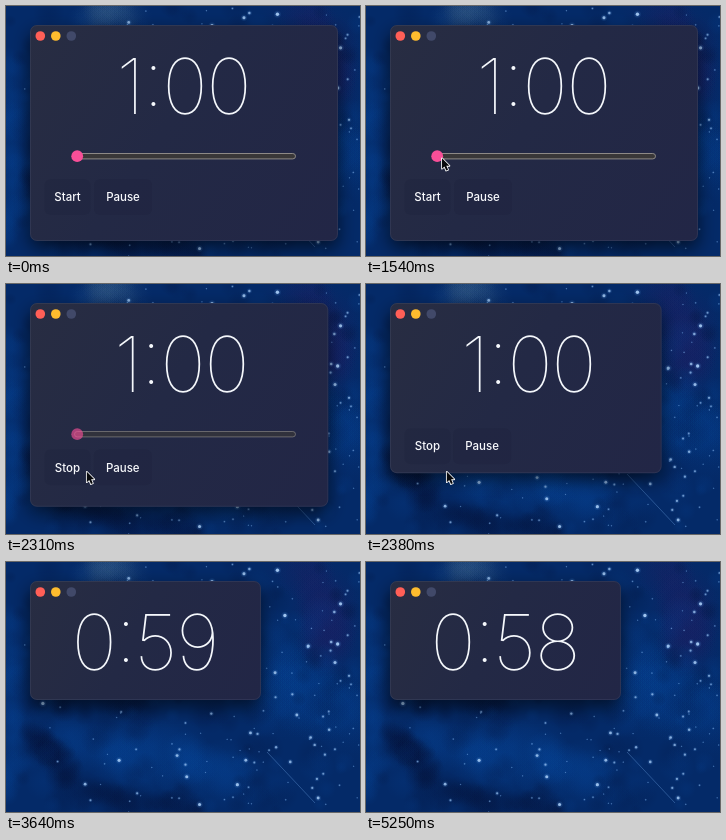
An HTML page with a canvas for the animation above (5320 ms loop, 354 by 250 pixels).

```html
<!DOCTYPE html>
<html lang="en">
<head>
<meta charset="utf-8">
<title>Timer</title>
<style>
html, body { margin: 0; width: 100%; height: 100%; overflow: hidden; background: #04265f; }
canvas { display: block; width: 354px; height: 250px; }
</style>
</head>
<body>
<canvas id="stage"></canvas>
<script>
const W = 354, H = 250, LOOP = 5320, STEP = 70;
const FONT = 'Inter, Roboto, sans-serif';
const scale = window.devicePixelRatio || 1;

function setup(canvas) {
  canvas.width = W * scale;
  canvas.height = H * scale;
  const c = canvas.getContext('2d');
  c.scale(scale, scale);
  return c;
}
const ctx = setup(document.getElementById('stage'));
const sky = document.createElement('canvas');

const lerp = (a, b, k) => a + (b - a) * k;
const clamp = v => Math.max(0, Math.min(1, v));
const smooth = v => { v = clamp(v); return v * v * (3 - 2 * v); };
const square = v => v * v;

function random(seed) {
  return () => (seed = (seed * 16807) % 2147483647) / 2147483647;
}
const rnd = random(4171);

function dot(c, x, y, r, fill) {
  c.fillStyle = fill;
  c.beginPath();
  c.arc(x, y, r, 0, Math.PI * 2);
  c.fill();
}

function box(x, y, w, h, r) {
  ctx.beginPath();
  ctx.roundRect(x, y, w, h, r);
}

function puff(c, x, y, r, rgb, alpha) {
  const g = c.createRadialGradient(x, y, 0, x, y, r);
  g.addColorStop(0, `rgba(${rgb},${alpha})`);
  g.addColorStop(0.5, `rgba(${rgb},${alpha * 0.6})`);
  g.addColorStop(1, `rgba(${rgb},0)`);
  dot(c, x, y, r, g);
}

// A soft, uneven streak of puffs between two points
function streak(c, [x0, y0], [x1, y1], r, rgb, alpha) {
  for (let k = 0; k <= 1; k += 0.05) {
    const x = lerp(x0, x1, k) + (rnd() - 0.5) * r;
    const y = lerp(y0, y1, k) + (rnd() - 0.5) * r;
    puff(c, x, y, r * (0.6 + rnd() * 0.6), rgb, alpha);
  }
}

function paintSky() {
  const c = setup(sky);
  const blue = '6,66,148', dark = '3,18,58', indigo = '24,32,98', teal = '60,100,140';
  c.fillStyle = '#042a68';
  c.fillRect(0, 0, W, H);
  streak(c, [70, 180], [240, 215], 32, blue, 0.28);
  streak(c, [3, 60], [3, 250], 20, blue, 0.28);
  streak(c, [270, 100], [350, 150], 45, blue, 0.12);
  streak(c, [300, 10], [330, 80], 30, indigo, 0.2);
  streak(c, [85, 8], [125, 8], 20, teal, 0.1);
  streak(c, [35, 140], [150, 150], 18, dark, 0.2);
  streak(c, [28, 170], [60, 215], 18, dark, 0.25);
  streak(c, [65, 232], [195, 250], 18, dark, 0.28);
  for (let i = 0; i < 160; i++) {
    puff(c, rnd() * W, rnd() * H, 5 + rnd() * 14, rnd() < 0.5 ? blue : dark, 0.18);
  }

  c.strokeStyle = 'rgba(90,140,205,.45)';
  c.beginPath();
  c.moveTo(261, 190);
  c.lineTo(309, 241);
  c.stroke();

  // stars gather towards the right
  for (let i = 0; i < 190; i++) {
    const x = W * Math.pow(rnd(), 0.6), y = H * rnd(), size = Math.pow(rnd(), 3);
    const r = 0.5 + size * 1.2;
    puff(c, x, y, r * 2.4, '100,165,240', 0.35);
    dot(c, x, y, r, `rgba(175,210,250,${0.3 + size * 0.6})`);
  }
}

function drawWindow(w, h) {
  ctx.save();
  ctx.shadowColor = 'rgba(0,0,0,.6)';
  ctx.shadowBlur = 18 * scale;
  ctx.shadowOffsetY = 7 * scale;
  const g = ctx.createLinearGradient(24, 19, 24 + w, 19 + h);
  g.addColorStop(0, '#282d42');
  g.addColorStop(0.45, '#232945');
  g.addColorStop(1, '#222646');
  ctx.fillStyle = g;
  box(24, 19, w, h, 7);
  ctx.fill();
  ctx.restore();
  ctx.lineWidth = 1;
  ctx.strokeStyle = 'rgba(150,165,200,.1)';
  box(24.5, 19.5, w - 1, h - 1, 6.5);
  ctx.stroke();
  ['#ff5f57', '#febc2e', '#414969'].forEach((color, i) => dot(ctx, 34.3 + i * 15.5, 30, 4.8, color));
}

// Centred digits with a raised colon
function drawTime(text, cx) {
  const gap = -1.5;
  ctx.font = `130 77px ${FONT}`;
  ctx.textAlign = 'left';
  ctx.fillStyle = '#f5f8fc';
  const widths = [...text].map(ch => ctx.measureText(ch).width + gap);
  let x = cx - (widths.reduce((a, b) => a + b) - gap) / 2;
  [...text].forEach((ch, i) => {
    ctx.fillText(ch, x, ch === ':' ? 100 : 108);
    x += widths[i];
  });
}

function drawSlider(hover) {
  box(68.5, 147.5, 221, 5.4, 2.7);
  ctx.fillStyle = '#393738';
  ctx.fill();
  ctx.strokeStyle = '#8d8986';
  ctx.lineWidth = 1;
  ctx.stroke();
  dot(ctx, 71.2, 150.2, 5.9, hover ? '#fb86bb' : '#f94f98');
}

function drawButton(label, x, y, w) {
  ctx.fillStyle = 'rgba(8,12,28,.07)';
  box(x - w / 2, y - 18, w, 36, 6);
  ctx.fill();
  ctx.font = `500 11.5px ${FONT}`;
  ctx.textAlign = 'center';
  ctx.fillStyle = '#f8f9fc';
  ctx.fillText(label, x, y + 4.2);
}

const arrow = new Path2D('M0 0V11.2L2.6 8.9L4.5 13.2L6.5 12.3L4.6 8.1H8Z');
const moves = [
  { at: 840, until: 1260, to: [75, 149], ease: smooth },
  { at: 1470, until: 1960, to: [79, 194], ease: smooth },
  { at: 2030, until: 2170, to: [80, 187], ease: smooth },
  { at: 2380, until: 2800, to: [8, 259], ease: square }
];

function drawCursor(t) {
  let x = 362, y = 232;
  for (const m of moves) {
    const k = m.ease(clamp((t - m.at) / (m.until - m.at)));
    x = lerp(x, m.to[0], k);
    y = lerp(y, m.to[1], k);
  }
  ctx.save();
  ctx.translate(x + 0.8, y + 0.8);
  ctx.scale(0.93, 0.93);
  ctx.lineJoin = 'round';
  ctx.lineWidth = 1.8;
  ctx.strokeStyle = '#fff';
  ctx.stroke(arrow);
  ctx.fillStyle = '#08090c';
  ctx.fill(arrow);
  ctx.restore();
}

function draw(t) {
  const k = smooth((t - 2250) / 270);
  ctx.drawImage(sky, 0, 0, W, H);
  drawWindow(lerp(308, 231, k), lerp(216, 119, k));
  // the digits trail the shrinking window slightly
  const cx = lerp(178, 139.5, smooth((t - 2275) / 245));
  drawTime(t < 3360 ? '1:00' : t < 4340 ? '0:59' : '0:58', cx);
  ctx.globalAlpha = clamp((2380 - t) / 110);
  if (t < 2380) drawSlider(t >= 1190 && t < 1540);
  ctx.globalAlpha = clamp((2520 - t) / 130);
  if (t < 2520) {
    const y = 191 - 61 * k;
    drawButton(t < 2310 ? 'Start' : 'Stop', 61.5, y, 46);
    drawButton('Pause', 117 - 2 * k, y, 58);
  }
  ctx.globalAlpha = 1;
  drawCursor(t);
}

paintSky();
const start = performance.now();
function tick() {
  const t = (performance.now() - start) % LOOP;
  draw(Math.floor(t / STEP) * STEP);
  requestAnimationFrame(tick);
}
tick();
</script>
</body>
</html>
```
